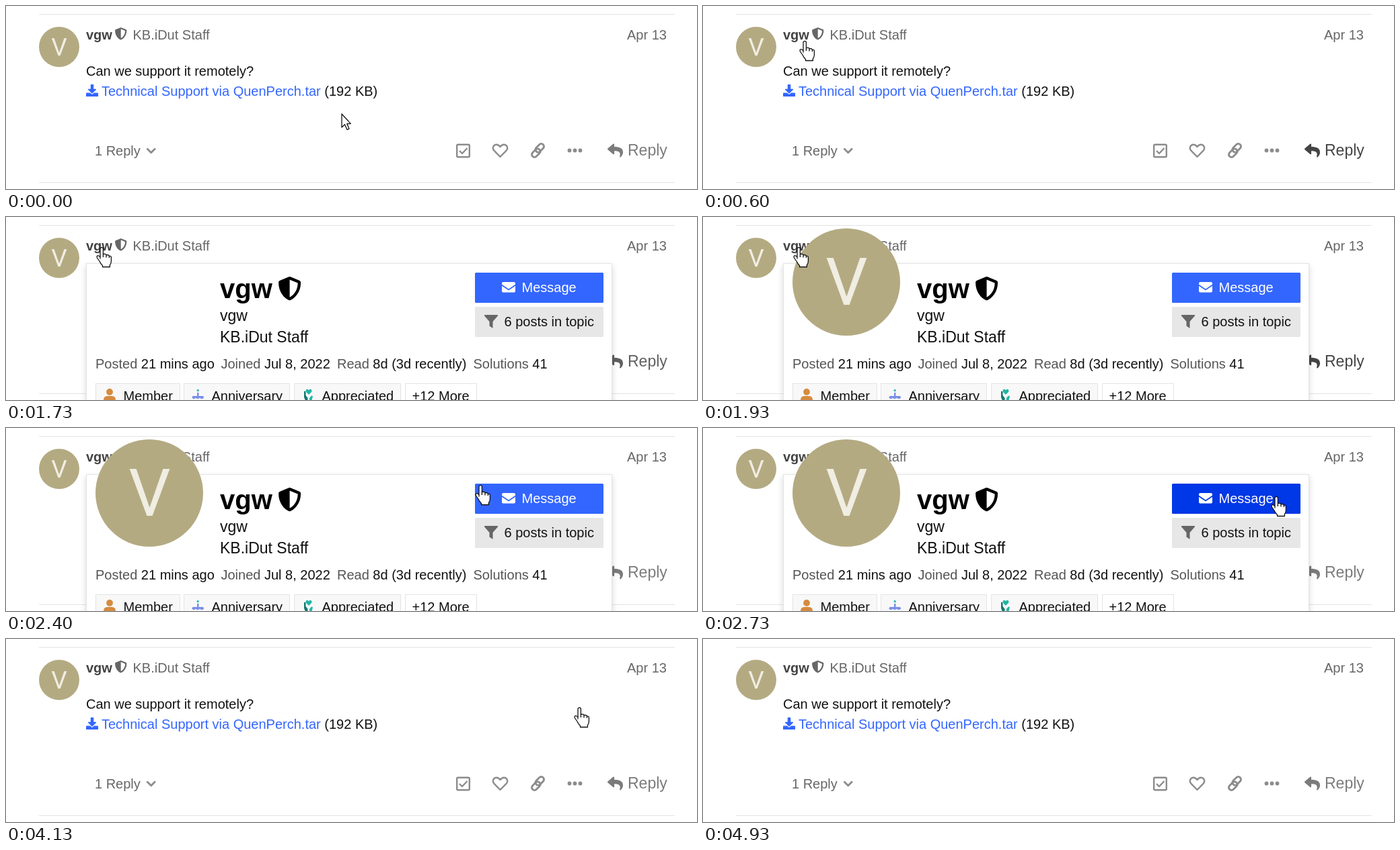
These frames come from a looping animation (1027 by 273 pixels, 5.47 s). An HTML page:

```html
<!DOCTYPE html>
<html lang="en">
<head>
<meta charset="utf-8">
<title>Forum user card</title>
<style>
  html, body { margin: 0; width: 100%; height: 100%; overflow: hidden; background: #fff; }
  svg { display: block; font: 20px "Liberation Sans", Arial, sans-serif; fill: #111; --btn: #36f; }
  .bold { font-weight: 700; }
  .mid { font-size: 23px; }
  .big { font-size: 40px; }
  .grey { fill: #666; }
  .label { fill: #555; }
  .link { fill: #36f; }
  .white { fill: #fff; }
  .rule { stroke: #e4e4e4; }
  .tool { fill: none; stroke: #8c8c8c; stroke-width: 2.4; stroke-linejoin: round; }
  .dots { fill: #8c8c8c; }
  .reply { fill: #444; }
  .tan { fill: #b4aa82; }
  .letter { font-family: Roboto, sans-serif; text-anchor: middle; fill: #f0ede2; }
  .panel { fill: #fff; stroke: #e4e4e4; filter: drop-shadow(0 4px 5px rgba(0, 0, 0, .16)); }
  .button { fill: var(--btn); }
  .flap { fill: none; stroke: var(--btn); stroke-width: 1.7; }
  .badge { fill: #f8f8f8; stroke: #e4e4e4; }
  .cursor { fill: #fff; stroke: #111; stroke-width: 1.3; stroke-linejoin: round; }
</style>
</head>
<body>
<svg width="1027" height="273" viewBox="0 0 1027 273">
  <defs>
    <path id="shield" d="M466.500 84l-192-80a48 48 0 0 0-37 0l-192 80C28 91 16 109 16 128c0 198 114 336 221 380 12 5 25 5 37 0C360 473 496 349 496 128c0-19-12-37-29.500-44zM256 446V65l176 74c-3 151-82 261-176 307z"/>
  </defs>

  <!-- post -->
  <path class="rule" d="M49 12.500H994M49 263.500H994"/>
  <circle class="tan" cx="79" cy="61" r="30"/>
  <text class="letter" x="79" y="74" font-size="37">V</text>
  <text class="bold" x="119" y="50" fill="#444">vgw</text>
  <use class="grey" href="#shield" transform="translate(161.500 32) scale(.036)"/>
  <text class="grey" x="188.500" y="50">KB.iDut Staff</text>
  <text class="grey" x="923" y="50">Apr 13</text>
  <text x="119" y="104">Can we support it remotely?</text>
  <path class="link" transform="translate(119 117) scale(.0352)" d="M216 0h80q24 0 24 24v168h88c18 0 27 21 14 34L270 378q-14 12-28 0L90 226c-13-13-4-34 14-34h88V24q0-24 24-24zM512 376v112q0 24-24 24H24q-24 0-24-24V376q0-24 24-24h147l49 49c20 20 52 20 72 0l49-49h147q24 0 24 24z"/>
  <text x="142" y="134"><tspan class="link">Technical Support via QuenPerch.tar</tspan> (192 KB)</text>
  <text class="grey" x="132" y="223">1 Reply</text>

  <!-- post controls -->
  <g class="tool">
    <path stroke-width="2.800" d="M209.500 212.500l6.200 6.200 6.200-6.200"/>
    <rect x="670.200" y="206.700" width="18.600" height="18.600" rx="1.500"/>
    <path d="M674 216l4 4 7.500-8"/>
    <path d="M734.500 225L725.800 216.200C721.500 211.500 725 206.800 729 206.800Q732 206.800 734.500 210Q737 206.800 740 206.800C744 206.800 747.500 211.500 743.200 216.200Z"/>
    <g transform="translate(790.500 215.500) rotate(-45)" stroke-width="2.900">
      <rect x="-11.800" y="-3.300" width="14.500" height="8" rx="4"/>
      <rect x="-2.700" y="-4.700" width="14.500" height="8" rx="4"/>
    </g>
  </g>
  <g class="dots">
    <circle cx="837.500" cy="215.500" r="2.900"/>
    <circle cx="845.500" cy="215.500" r="2.900"/>
    <circle cx="853.500" cy="215.500" r="2.900"/>
  </g>
  <g id="reply" class="reply">
    <path transform="translate(894 204) scale(.045)" d="M8 190L184 38c16-13 40-3 40 18v80c161 2 288 34 288 186 0 62-40 122-83 154-14 10-33-2-28-18 45-145-22-184-177-186v88c0 21-24 32-40 18L8 226q-16-18 0-36z"/>
    <text class="mid" x="924" y="223">Reply</text>
  </g>

  <!-- user card -->
  <g id="card">
    <rect class="panel" x="119.500" y="69.500" width="781" height="260"/>
    <text class="bold big" x="318" y="120.500" fill="#000">vgw</text>
    <use href="#shield" fill="#000" transform="translate(404 89) scale(.0688)"/>
    <text class="mid" x="318" y="155">vgw</text>
    <text class="mid" x="318" y="187">KB.iDut Staff</text>

    <rect class="button" x="697" y="83" width="191" height="45" rx="1.500"/>
    <rect class="white" x="737" y="97" width="20" height="15.500" rx="2"/>
    <path class="flap" d="M736 101l11 7.500 11-7.500"/>
    <text class="white" x="766.500" y="112">Message</text>
    <rect x="697" y="134" width="191" height="45" rx="1.500" fill="#e7e7e7"/>
    <path class="grey" d="M712 146h18q2 0 .5 2l-7 8v10l-5-3.500V156l-7-8q-1.500-2 .5-2z"/>
    <text x="740.500" y="163">6 posts in topic</text>

    <text x="133" y="226"><tspan class="label">Posted</tspan> 21 mins ago</text>
    <text x="319.500" y="226"><tspan class="label">Joined</tspan> Jul 8, 2022</text>
    <text x="492" y="226"><tspan class="label">Read</tspan> 8d (3d recently)</text>
    <text x="694.500" y="226"><tspan class="label">Solutions</tspan> 41</text>

    <g class="badge">
      <rect x="133.500" y="248.500" width="125" height="40"/>
      <rect x="264.500" y="248.500" width="157" height="40"/>
      <rect x="428.500" y="248.500" width="158" height="40"/>
      <rect class="white" x="593.500" y="248.500" width="106" height="40"/>
    </g>
    <g fill="#d68b3f">
      <circle cx="154" cy="261" r="4.900"/>
      <path d="M145 276v-3q0-6 6-6h6q6 0 6 6v3z"/>
    </g>
    <path fill="#7a8fe8" d="M284 262h2.500v5h5.500q2 0 2 2v1l-3 1.500-3-1.500-3 1.500-3-1.500-3 1.500-2.500-1.500v-1q0-2 2-2h5.500zM276 273h19v2h-19z"/>
    <circle cx="285.200" cy="258.800" r="1.700" fill="#36b5b0"/>
    <path fill="#16776f" d="M443 260q2-1 2.500 1v5l3 4v5h-3l-2.500-6z"/>
    <path fill="#1fb5a3" d="M450 265l-4-4q-1.500-4 2-4.300l2 1.500 2-1.500q3.500.3 2 4.300zM451 270l3-3.500 2 1-2 7.500h-3z"/>
    <text x="174.500" y="274">Member</text>
    <text x="305.500" y="274">Anniversary</text>
    <text x="469.500" y="274">Appreciated</text>
    <text x="603.500" y="274">+12 More</text>

    <g id="portrait">
      <circle class="tan" cx="213" cy="97" r="80"/>
      <text class="letter" x="213.500" y="131" font-size="98">V</text>
    </g>
  </g>

  <!-- pointer, origin at the hot spot -->
  <g id="pointer" class="cursor">
    <path id="arrow" d="M0 0V20L4.500 15.800L8 23.500L11 22.200L7.800 14.600H13.300Z"/>
    <g id="hand">
      <path d="M-2 16V1.500a2.200 2.200 0 0 1 4.400 0V9.500q4-1 4.600 1.200 3.600-.8 4.400 1.400 3-.4 3 2.600V20q0 3-2 5.500V28.500H1.500V26.500q-3-3-4.500-6.500l-3.500-5q-1.200-2.800 1-3.300 2-.3 3.500 2.300z"/>
      <path fill="none" d="M2.400 9.500V14M7 10.700V14.500M11.400 12V15"/>
    </g>
  </g>
</svg>
<script>
  const LOOP = 5470, FPS = 15;
  const LEAD = 30; // under half a step, covers start-up and paint delay
  const $ = id => document.getElementById(id);
  const svg = document.querySelector('svg');
  const lerp = (a, b, k) => a + (b - a) * k;
  const clamp = k => Math.min(1, Math.max(0, k));
  const show = (id, on) => { $(id).style.display = on ? '' : 'none'; };

  // Linear track through [step, value] pairs.
  function track(n, keys) {
    const i = keys.findIndex(k => k[0] > n);
    if (i < 0) return keys[keys.length - 1][1];
    if (i === 0) return keys[0][1];
    const [a, b] = [keys[i - 1], keys[i]];
    return lerp(a[1], b[1], (n - a[0]) / (b[0] - a[0]));
  }

  const easeOut = p => k => 1 - (1 - k) ** p;
  const easeIn = p => k => k ** p;
  const name = [142, 46], message = [852, 103];
  const moves = [
    { from: [499, 161], to: name, start: 0, end: 11, x: easeOut(2.16), y: easeOut(1.65) },
    { from: name, to: message, start: 30, end: 41, x: easeOut(2), y: easeOut(1.53) },
    { from: message, to: [466, 262], start: 64, end: 70, x: easeIn(1.5), y: easeIn(1.5) }
  ];
  const handSpans = [[9, 23], [25, 31], [36, 65]];

  const replyFade = [[0, .7], [4, 1], [23, 1], [26, .85], [29, 1], [32, 1], [36, .7],
                     [64, .7], [68, 1], [71, 1], [74, .7]];
  const cardFade = [[23, 0], [26, 1], [60, 1], [62, 0]];
  const hoverFade = [[36, 0], [39, 1]];

  function buttonColor(n) {
    if (n >= 59) return '#0027a3';
    const k = track(n, hoverFade);
    return `rgb(${lerp(51, 0, k)}, ${lerp(102, 55, k)}, ${lerp(255, 230, k)})`;
  }

  function draw(n) {
    const m = moves.filter(m => m.start <= n).pop();
    const k = clamp((n - m.start) / (m.end - m.start));
    const x = Math.round(lerp(m.from[0], m.to[0], m.x(k)));
    const y = Math.round(lerp(m.from[1], m.to[1], m.y(k)));
    const hand = handSpans.some(([a, b]) => n >= a && n < b);

    $('pointer').setAttribute('transform', `translate(${x} ${y})`);
    show('pointer', n < 71);
    show('hand', hand);
    show('arrow', !hand);
    show('portrait', n >= 27);
    $('reply').style.opacity = track(n, replyFade);
    $('card').style.opacity = track(n, cardFade);
    svg.style.setProperty('--btn', buttonColor(n));
  }

  const start = performance.now();
  function tick() {
    const t = (performance.now() - start + LEAD) % LOOP;
    draw(Math.floor(t * FPS / 1000));
    requestAnimationFrame(tick);
  }
  tick();
</script>
</body>
</html>
```
